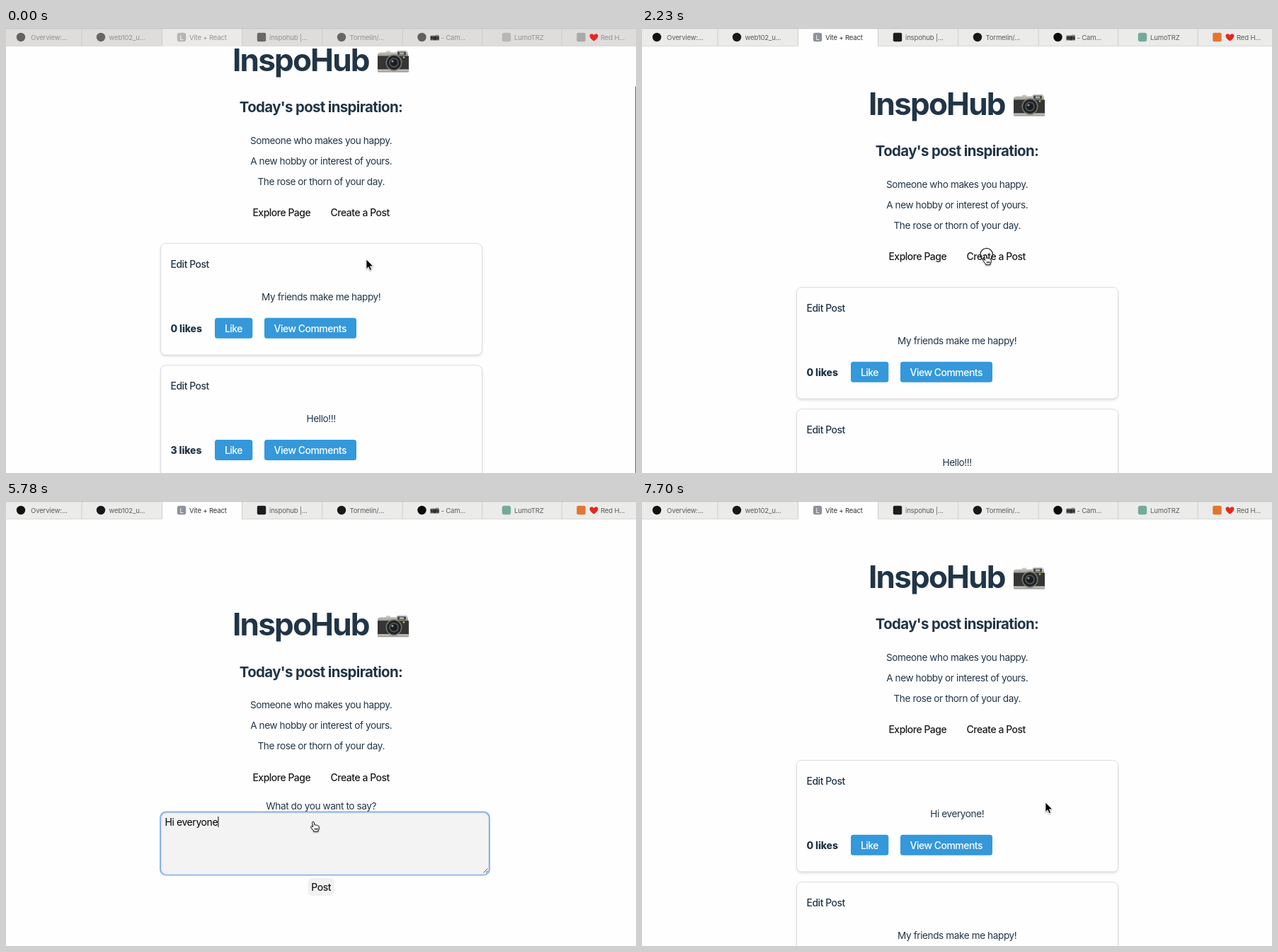
An HTML page for the animation above (8000 ms loop, 890 px wide and 629 px high).

```html
<!DOCTYPE html>
<html lang="en">
<head>
<meta charset="utf-8">
<title>InspoHub</title>
<style>
html, body { margin: 0; height: 100%; overflow: hidden; background: #fefefe; }
svg { display: block; width: 100vw; height: 100vh; }
text { font: 13.6px Inter, sans-serif; letter-spacing: -.03em; fill: #213547; white-space: pre; }
.mid { text-anchor: middle; }
.h1 { font-size: 44px; font-weight: 700; letter-spacing: -.041em; }
.h2 { font-size: 20.4px; font-weight: 700; letter-spacing: -.031em; }
.med { font-size: 13.9px; font-weight: 500; letter-spacing: -.032em; }
.dark { fill: #1a1a1a; }
.white { fill: #fff; }
.likes { font-size: 14px; font-weight: 800; letter-spacing: -.008em; }
.card { fill: #fefefe; stroke: #dcdcdc; filter: drop-shadow(0 2px 1.5px rgba(0,0,0,.11)); }
#typed { font-size: 14px; fill: #000; }
#tabs text { font-size: 9.6px; letter-spacing: -.02em; fill: #5c5c5c; }
#tabs .bar { fill: #ebebea; }
#tabs .on { fill: #fefefe; }
#tabs .label.cur { fill: #333; }
#tabs .letter { fill: #fff; }
#tabs.idle .bar { fill: #dedddc; }
#tabs.idle .on { fill: #ebeae9; }
#tabs.idle .label, #tabs.idle .label.cur { fill: #929292; }
#tabs.idle .icon { filter: grayscale(1); opacity: .6; }
#pointer { filter: drop-shadow(0 1px 1px rgba(0,0,0,.35)); }
</style>
</head>
<body>
<svg viewBox="0 0 890 629">
  <defs>
    <linearGradient id="silver" x2="0" y2="1">
      <stop stop-color="#d9d7d0"/><stop offset="1" stop-color="#8f8d87"/>
    </linearGradient>
    <g id="cam">
      <path d="M3 4h9v-2h6v2h8l2-3h13l2 4v6H0V6z" fill="url(#silver)"/>
      <path d="M28 3h12v5H28z" fill="#4b4d4c"/>
      <path d="M31 4h6v3h-6z" fill="#a9aeab"/>
      <rect y="9" width="44" height="20" fill="#353535"/>
      <rect y="28" width="44" height="4" rx="1" fill="url(#silver)"/>
      <circle cx="23" cy="18.500" r="11.500" fill="#777874"/>
      <circle cx="23" cy="18.500" r="10" fill="#202122"/>
      <circle cx="23" cy="18.500" r="7" fill="#4c5154"/>
      <circle cx="23" cy="18.500" r="5" fill="#191d21"/>
      <circle cx="21" cy="16.500" r="1.600" fill="#8c979e"/>
      <circle cx="37" cy="11" r="1.200" fill="#d9c13e"/>
    </g>
  </defs>
  <rect width="890" height="629" fill="#fefefe"/>
  <g id="head"></g>
  <g id="cards"></g>
  <g id="form">
    <rect id="ring" x="217" y="438.500" width="467" height="91" rx="9" fill="#8ab2ee"/>
    <rect id="area" x="219.500" y="441" width="462" height="86.500" rx="7" fill="#f3f3f3" stroke="#c9c9c9"/>
    <path d="M674.500 525.500l6-6M678 525.500l2.500-2.500" stroke="#555"/>
    <text id="typed" x="224.500" y="458.500"></text>
    <rect id="caret" y="446" width="1" height="15"/>
    <rect x="426.500" y="533" width="37.500" height="25" rx="6" fill="#f1f1f1"/>
  </g>
  <rect id="thumb" x="889" width="1" fill="#666"/>
  <g id="tabs"></g>
  <circle id="click" r="8.800" fill="none" stroke="#222" stroke-width="1.200"/>
  <g id="pointer">
    <path id="arrow" d="M0 0V13.600L3.100 10.700 5.200 15.600 7.500 14.600 5.400 9.800H9.700Z" stroke="#fff" stroke-width=".8"/>
    <path id="hand" d="M-1.300 1.200Q-1.200-.3 0-.2 1.200-.1 1.400 1.200L1.900 4.600Q3.300 3.700 4.300 4.900 5.500 4.200 6.500 5.500 8.200 5.200 8.200 7V9.500Q8 11 7 12.200V13.700H.5V12.300Q-1.400 10.300-3.200 7.800-3.700 6.300-2.300 6.100-1.200 6.200-.3 7.500ZM2.500 9v2.600M4.300 9v2.600M6 9v2.600" fill="#fff" stroke="#111" stroke-linejoin="round"/>
  </g>
</svg>
<script>
const $ = id => document.getElementById(id);
const text = (x, y, s, cls = '') => `<text x="${x}" y="${y}" class="${cls}">${s}</text>`;
const rect = (x, y, w, h, attrs) => `<rect x="${x}" y="${y}" width="${w}" height="${h}" ${attrs}/>`;
const show = (id, on) => $(id).style.display = on ? '' : 'none';
const move = (id, x, y) => $(id).setAttribute('transform', `translate(${x} ${y})`);

const center = 445.2;

$('head').innerHTML =
  text(320, 122.5, 'InspoHub', 'h1') +
  '<use href="#cam" x="525" y="92.500"/>' +
  text(445, 181, "Today's post inspiration:", 'h2 mid') +
  ['Someone who makes you happy.', 'A new hobby or interest of yours.', 'The rose or thorn of your day.']
    .map((s, i) => text(center, 225.5 + 29 * i, s, 'mid')).join('') +
  text(389.3, 328, 'Explore Page', 'med dark mid') +
  text(500.2, 328, 'Create a Post', 'med dark mid');

$('form').insertAdjacentHTML('beforeend',
  text(center, 435.5, 'What do you want to say?', 'mid') +
  text(center, 550.5, 'Post', 'med dark mid'));

const card = (y, msg, likes) =>
  `<g transform="translate(0 ${y})">` +
  rect(218.5, 0, 454, 157.5, 'rx="7" class="card"') +
  text(232.5, 34.5, 'Edit Post', 'med') +
  text(center, 80.5, msg, 'mid') +
  text(232.5, 125, likes + ' likes', 'likes') +
  rect(295, 105.3, 53.3, 29, 'rx="3.500" fill="#3498db"') +
  rect(365, 105.3, 130, 29, 'rx="3.500" fill="#3498db"') +
  text(321.5, 125, 'Like', 'med white mid') +
  text(429.8, 125, 'View Comments', 'med white mid') + '</g>';

const posts = [['Hi everyone!', 0], ['My friends make me happy!', 0], ['Hello!!!', 3]];
const feed = list => list.map((p, i) => card(366.5 + 172.2 * i, ...p)).join('');

// Tabs: label, label x, icon x, icon colour, icon corner radius
const tabs = [
  ['Overview:...', 35, 21, '#111', 6.2], ['web102_u...', 145.5, 134, '#181818', 6.2],
  ['Vite + React', 259, 248, '#8e929c', 3], ['inspohub |...', 372, 361, '#1c1c1c', 2],
  ['Tormelin/...', 485.5, 474, '#181818', 6.2], ['- Cam...', 614.5, 587.5, '#0c0c0c', 6.2],
  ['LumoTRZ', 718, 707, '#74aa9c', 3], ['Red H...', 840, 812.5, '#e2762f', 2]
];
$('tabs').innerHTML =
  rect(0, 0, 890, 25.5, 'class="bar"') +
  rect(220.5, 1, 112.5, 25, 'class="on"') +
  rect(0, 0, 890, 1.2, 'fill="#c4c3c2"') +
  rect(0, 25, 220, .8, 'fill="#d2d2d2"') + rect(333, 25, 557, .8, 'fill="#d2d2d2"') +
  [106.5, 220, 333, 446.3, 559.7, 672.3, 784.7].map(x => rect(x, 1, .9, 24.5, 'fill="#cbcbca"')).join('') +
  tabs.map(([s, x, ix, color, r], i) =>
    rect(ix - 6.2, 6.8, 12.4, 12.4, `rx="${r}" fill="${color}" class="icon"`) +
    text(x, 16.7, s, i == 2 ? 'label cur' : 'label')).join('') +
  text(248, 16.7, 'L', 'mid letter') +
  '<use href="#cam" transform="translate(599.500 9) scale(.28)"/>' +
  '<path d="M830.500 18.500C825 14.800 824.300 12 824.600 10.500 825.300 7.600 829.200 7.400 830.500 10.300 831.800 7.400 835.700 7.600 836.400 10.500 836.700 12 836 14.800 830.500 18.500Z" fill="#e3291f"/>';

const scroll = [-62, -20, 5, 3, 1.5, .7, .3];
// Pointer path: tick, x, y
const track = [
  [0, 509, 327], [3, 509, 327], [8, 485, 321], [15, 485, 321], [20, 434, 453.5], [41, 434, 453.5],
  [45, 446, 569], [46, 447, 552], [49, 446, 551], [52, 570, 426], [54, 570, 426]
];
function pointerAt(k) {
  const i = track.findIndex(p => p[0] > k);
  const [a, b] = [track[i - 1], track[i]];
  const u = (k - a[0]) / (b[0] - a[0]);
  return [a[1] + (b[1] - a[1]) * u, a[2] + (b[2] - a[2]) * u];
}

const message = 'Hi everyone!';
function typedAt(k) {
  const n = k < 30 ? 0 : k < 36 ? k - 29 : k < 38 ? 8 : k < 39 ? 10 : k < 41 ? 11 : 12;
  return message.slice(0, n);
}

let last = -1;
function draw() {
  // The picture advances in 54 equal ticks per loop; the small lead absorbs rounding to 10 ms.
  const k = Math.floor(performance.now() % 8000 * 54 / 8000 + .12) % 54;
  requestAnimationFrame(draw);
  if (k == last) return;
  last = k;

  const form = k >= 16 && k < 49, blank = k == 49;
  const off = scroll[k] || 0;
  show('head', !blank);
  show('cards', !form && !blank);
  show('form', form);
  move('head', 0, form ? 67.7 : off);
  move('cards', 0, off);
  $('cards').innerHTML = feed(k < 16 ? posts.slice(1) : posts.slice(0, 2));

  $('thumb').setAttribute('y', 27 - Math.min(0, off) * .9);
  $('thumb').setAttribute('height', 548 - Math.max(0, off));
  $('thumb').style.opacity = Math.max(0, Math.min(1, (13 - k) / 3));
  $('tabs').setAttribute('class', k < 9 ? 'idle' : '');

  const focus = k >= 22 && k < 48;
  show('ring', focus);
  $('area').setAttribute('stroke', focus ? '#e2e6ec' : '#c9c9c9');
  $('typed').textContent = typedAt(k);
  show('caret', focus && !(k >= 25 && k < 28));
  if (form) $('caret').setAttribute('x', 224.7 + $('typed').getComputedTextLength());

  const [x, y] = pointerAt(k), hand = k >= 10 && k < 49;
  move('pointer', x, y);
  move('click', x + 1.7, y - .8);
  show('hand', hand);
  show('arrow', !hand);
  show('click', [9, 15, 21, 47].includes(k));
}
draw();
</script>
</body>
</html>
```
